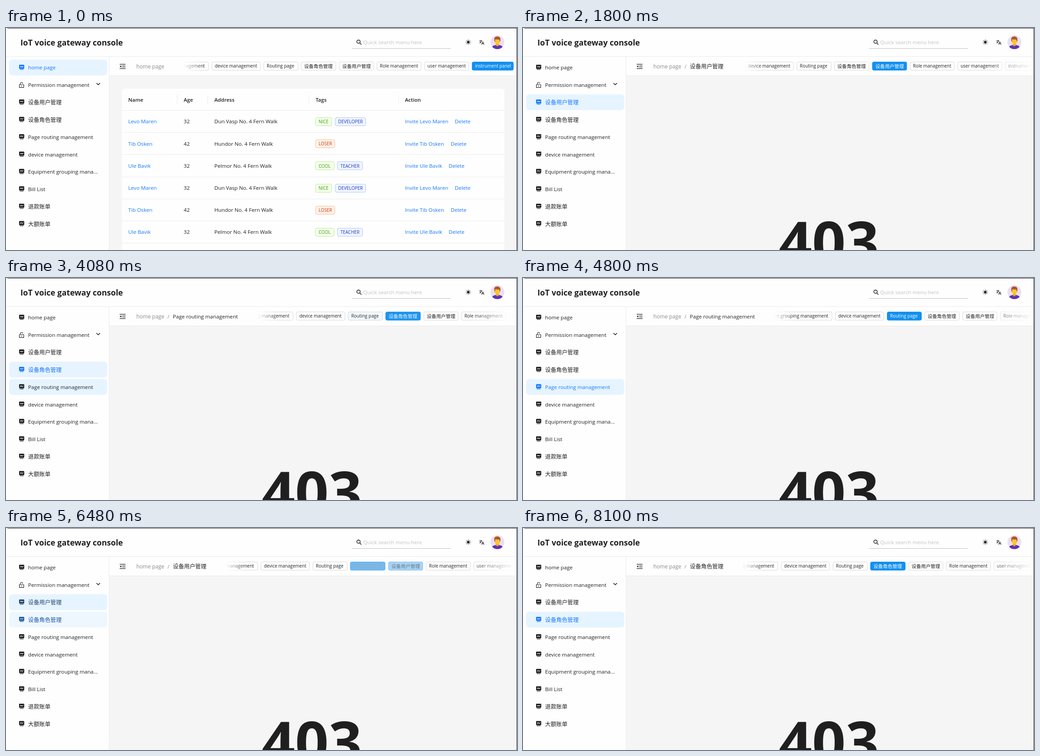
An HTML page that plays this animation: 1133x494 px, repeating every 8640 ms.

```html
<!DOCTYPE html>
<html lang="zh-CN">
<head>
<meta charset="utf-8">
<title>Console</title>
<style>
  html, body { margin: 0; width: 100%; height: 100%; overflow: hidden; background: #fefefe; }
  svg { display: block; }
  text { font-family: "Open Sans", "Noto Sans", sans-serif; white-space: pre; }
  text.zh { font-family: "Noto Sans CJK SC", "Noto Sans CJK", sans-serif; }
</style>
</head>
<body>
<svg id="stage" xmlns="http://www.w3.org/2000/svg" width="1133" height="494" viewBox="0 0 1133 494">
  <defs>
    <linearGradient id="fadeL"><stop offset="0" stop-color="#fefefe"/><stop offset="1" stop-color="#fefefe" stop-opacity="0"/></linearGradient>
    <linearGradient id="fadeR"><stop offset="0" stop-color="#fefefe" stop-opacity="0"/><stop offset="1" stop-color="#fefefe"/></linearGradient>
    <clipPath id="disc"><circle cx="1089.5" cy="31.5" r="15.5"/></clipPath>
  </defs>
  <rect width="1133" height="494" fill="#fefefe"/>
  <rect x="228" y="106" width="905" height="388" fill="#f5f5f5"/>
  <g id="table"></g>
  <g id="denied"></g>
  <g id="tabs"></g>
  <g id="coverL">
    <rect x="-270" y="72" width="300.5" height="26" fill="#fefefe"/>
    <rect x="30" y="72" width="45" height="26" fill="url(#fadeL)"/>
  </g>
  <rect id="coverR" x="1030" y="72" width="98" height="26" fill="url(#fadeR)"/>
  <rect x="1127" y="72" width="6" height="26" fill="#fefefe"/>
  <g id="crumbs"></g>
  <g id="menu"></g>
  <g id="head"></g>

  <!-- frame lines -->
  <path d="M0 63.5H1133M228.5 64V494M228 106.5H1133" stroke="#ebebeb" fill="none"/>
  <path d="M3 .5H1133M1132.5 0V494" stroke="#3a3a3a" fill="none"/>

  <!-- search, fold, sun and language icons -->
  <path d="M767 45.5H986" stroke="#bdbdbd"/>
  <g fill="none" stroke="#1f1f1f" stroke-width="1.5">
    <circle cx="781.6" cy="30.4" r="3.7"/><path d="M784.4 33.2L788 37"/>
    <path d="M252 80.6H265M257.5 84H265M257.5 87H265M252 90.4H265" stroke-width="1.2"/>
    <path d="M1025 25.8v1.6M1025 35.6v1.6M1019.3 31.5h1.6M1029.1 31.5h1.6M1021 27.5l1.1 1.1M1027.9 34.4l1.1 1.1M1021 35.5l1.1-1.1M1027.9 28.6l1.1-1.1" stroke-width="1.2"/>
    <path d="M1049.5 28.2h6.5M1052.7 26.8v1.4M1055 28.4q-1.2 3.6-5 5.2M1050.8 29.8q1.2 2.4 3.4 3.6M1054.6 37l2.7-6.2 2.7 6.2M1055.6 35h3.4" stroke-width="1.1"/>
  </g>
  <path d="M255.6 83v5l-3.4-2.5z" fill="#1f1f1f"/>
  <circle cx="1025" cy="31.5" r="2.9" fill="#1f1f1f"/>

  <!-- avatar -->
  <g clip-path="url(#disc)">
    <circle cx="1089.5" cy="31.5" r="15.5" fill="#e9e0f5"/>
    <path d="M1077.5 48v-4q0-4 5-5.2l4-1.3h6l4 1.3q5 1.2 5 5.2V48z" fill="#5e35b1"/>
    <path d="M1086.5 33h6v6q-3 3-6 0z" fill="#f5a81c"/>
    <ellipse cx="1089.5" cy="29.5" rx="6" ry="6.8" fill="#fdc62f"/>
    <path d="M1083 30q-1.500-7 1-9.500 3-2.500 7-1.500 5.500 1 5.300 6.500l-.3 4.500-1.300-.5q.2-2.500-1.700-4-4.600.500-8-.5-.8 2-.7 5z" fill="#b0562c"/>
  </g>
</svg>
<script>
const NS = 'http://www.w3.org/2000/svg';
const INK = '#1f1f1f', BLUE = '#1677ff';
const USER = '设备用户管理', ROLE = '设备角色管理';
const $ = id => document.getElementById(id);

function add(parent, tag, attrs) {
  const el = document.createElementNS(NS, tag);
  for (const k in attrs) el.setAttribute(k, attrs[k]);
  return parent.appendChild(el);
}

// Text placed by its left edge and the middle of the line
function label(parent, str, x, mid, fill = INK, size = 11.65, weight = 400) {
  const zh = /[\u4e00-\u9fff]/.test(str);
  const px = zh ? size * 1.063 : size;
  const el = add(parent, 'text', { x, y: mid + px * 0.37, fill, 'font-size': px, 'font-weight': weight });
  if (zh) el.setAttribute('class', 'zh');
  el.textContent = str;
  return el;
}

function box(parent, x, y, width, height, rx, fill, stroke) {
  return add(parent, 'rect', { x, y, width, height, rx, fill, stroke: stroke || 'none' });
}

// Header
label($('head'), 'IoT voice gateway console', 32, 32, INK, 17.6, 700);
label($('head'), 'Quick search menu here', 792, 32, '#c2c2c2', 11.5);

// Side menu
const menu = ['home page', 'Permission management', USER, ROLE, 'Page routing management',
  'device management', 'Equipment grouping mana...', 'Bill List', '退款账单', '大额账单'
].map((name, i) => {
  const mid = 88 + 38.65 * i, g = add($('menu'), 'g', { color: INK });
  const grey = box(g, 7, mid - 17.7, 217.5, 35.2, 7, '#f0f0f0');
  const bg = box(g, 7, mid - 17.7, 217.5, 35.2, 7, '#e6f4ff');
  grey.style.opacity = bg.style.opacity = 0;
  const icon = add(g, 'g', { transform: `translate(29 ${mid - 6.3})` });
  if (i === 1) {
    add(icon, 'path', { d: 'M.6 5.6H10.4V12H.6ZM2.8 5.6V3.4Q2.8.9 5.5.9T8.2 3.2M5.5 8v1.8',
      fill: 'none', stroke: INK, 'stroke-width': 1.1 });
    add(g, 'path', { d: `M200.7 ${mid - 4}l3.8 3.8l3.8-3.8`, fill: 'none', stroke: INK, 'stroke-width': 1.5 });
  } else {
    box(icon, 0, 0, 11.4, 9.2, 1.4, 'currentColor');
    add(icon, 'path', { d: 'M2 5.7L4.3 3.5L6.8 5.5L9.4 3.3', fill: 'none', stroke: '#fff', 'stroke-width': 1.1 });
    box(icon, 1.6, 10.1, 8.2, 1.2, 0, 'currentColor');
  }
  label(g, name, 49, mid + 0.1, 'currentColor');
  return { g, bg, grey };
});

// Tabs: name, left edge, width
const tabs = [['Equipment grouping management', 275, 174], ['device management', 456.5, 107.5],
  ['Routing page', 571.5, 76], [ROLE, 654.5, 77], [USER, 739, 76], ['Role management', 822.5, 98],
  ['user management', 928, 98], ['instrument panel', 1033.5, 91.5]
].map(([name, x, w]) => ({
  rect: box($('tabs'), x, 75.5, w, 18.5, 3, '#fff', '#d9d9d9'),
  text: label($('tabs'), name, x + 6.5, 84.8, INK, 9.95)
}));

// Breadcrumb
label($('crumbs'), 'home page', 289, 85.7, '#8c8c8c', 11.8);
const slash = label($('crumbs'), '/', 358, 85.7, '#8c8c8c');
const crumb = label($('crumbs'), USER, 370, 85.5);
const crumbZh = label($('crumbs'), ROLE, 370, 85.5);
const crumbEn = label($('crumbs'), 'Page routing management', 370, 85.7);

// Table
const table = $('table');
const tagStyle = {
  green: ['#389e0d', '#f6ffed', '#b7eb8f'],
  navy: ['#1d39c4', '#f0f5ff', '#adc6ff'],
  red: ['#d4380d', '#fff2e8', '#ffbb96']
};
const people = [
  ['Levo Maren', 32, 'Dun Vasp No. 4 Fern Walk', 995, [['NICE', 686.5, 35.5, 'green'], ['DEVELOPER', 730, 67.5, 'navy']]],
  ['Tib Osken', 42, 'Hundor No. 4 Fern Walk', 986, [['LOSER', 686.5, 42.5, 'red']]],
  ['Ule Bavik', 32, 'Pelmor No. 4 Fern Walk', 981.5, [['COOL', 686.5, 41, 'green'], ['TEACHER', 735, 55.5, 'navy']]]
];
add(table, 'path', { d: 'M257 494V142q0-7 7-7H1098q7 0 7 7V494z', fill: '#fefefe' });
[['Name', 271], ['Age', 394], ['Address', 462], ['Tags', 686.5], ['Action', 884.5]]
  .forEach(([s, x]) => label(table, s, x, 159.3, INK, 11.5, 600));
add(table, 'path', { d: 'M379.5 149v20M447.5 149v20M671.5 149v20M870.5 149v20', stroke: '#ececec' });
for (let i = 0; i < 7; i++) {
  const line = Math.round(183 + 49.2 * i) + 0.5, mid = 208 + 49.2 * i;
  add(table, 'path', { d: `M257 ${line}H1105`, stroke: '#ececec' });
  if (i === 6) break;
  const [name, age, address, delX, tags] = people[i % 3];
  label(table, name, 271, mid, BLUE);
  label(table, String(age), 394, mid);
  label(table, address, 462, mid);
  label(table, 'Invite ' + name, 884.5, mid, BLUE);
  label(table, 'Delete', delX, mid, BLUE);
  for (const [s, x, w, kind] of tags) {
    const [ink, fill, edge] = tagStyle[kind];
    box(table, x, Math.round(mid - 9) + 0.5, w, 18, 3, fill, edge);
    label(table, s, x + 6.5, mid + 0.6, ink, 9.95);
  }
}

// Error page
add($('denied'), 'text', { x: 678, y: 523.5, fill: INK, 'font-size': 130, 'font-weight': 700, 'text-anchor': 'middle' })
  .textContent = '403';

// Pages: menu item, tab, left edge of the tab strip, tab shift at rest
const pages = {
  home: { item: 0, tab: 7, left: 363, shift: 0 },
  user: { item: 2, tab: 4, left: 456, shift: 34.5, crumb },
  role: { item: 3, tab: 3, left: 456, shift: 116, crumb: crumbZh },
  route: { item: 4, tab: 2, left: 527, shift: 236, crumb: crumbEn }
};
// Visits: page, time of press, time of switch
const visits = [['home', -2000, -2000], ['user', 1250, 1290], ['role', 2520, 2565], ['route', 3960, 4050],
  ['role', 5190, 5220], ['user', 6240, 6380], ['role', 7320, 7390]];
const LOOP = 8640, SLIDE = 560, TINT = 240;

const ramp = (t, from, len) => Math.min(1, Math.max(0, (t - from) / len));
const ease = k => k * k * (3 - 2 * k);
const rgb = hex => [1, 3, 5].map(i => parseInt(hex.slice(i, i + 2), 16));
function mix(a, b, k) {
  const to = rgb(b);
  return `rgb(${rgb(a).map((v, i) => Math.round(v + (to[i] - v) * k))})`;
}

function draw(t) {
  let n = visits.length - 1;
  while (n && t < visits[n][1]) n--;
  const [name, press, go] = visits[n];
  const next = pages[name], prev = pages[visits[Math.max(0, n - 1)][0]];
  const switched = t >= go, page = switched ? next : prev;
  const tint = ease(ramp(t, go, TINT)), pressed = ramp(t, press, 100);
  const weight = (i, a, b, inK) => i === b ? inK : i === a ? 1 - tint : 0;

  menu.forEach((m, i) => {
    m.bg.style.opacity = weight(i, prev.item, next.item, pressed);
    m.g.setAttribute('color', mix(INK, BLUE, weight(i, prev.item, next.item, tint)));
  });
  menu[3].grey.style.opacity = ramp(t, 6930, 120) * (1 - ramp(t, 7320, 100));

  tabs.forEach((tab, i) => {
    const k = weight(i, prev.tab, next.tab, tint);
    tab.rect.setAttribute('fill', mix('#fefefe', '#1390f0', k));
    tab.rect.setAttribute('stroke', mix('#d9d9d9', '#1390f0', k));
    tab.text.setAttribute('fill', mix(INK, '#ffffff', k));
  });

  // The strip jumps with the breadcrumb width, then scrolls to rest
  let shift = prev.shift;
  if (switched) {
    const from = prev.shift + next.left - prev.left;
    shift = from + (next.shift - from) * ease(ramp(t, go, SLIDE));
  }
  $('tabs').setAttribute('transform', `translate(${shift.toFixed(2)} 0)`);
  $('coverL').setAttribute('transform', `translate(${page.left} 0)`);
  $('coverR').style.opacity = ramp(t, 1290, 300);

  const home = page === pages.home;
  table.style.display = home ? '' : 'none';
  $('denied').style.display = slash.style.display = home ? 'none' : '';
  for (const c of [crumb, crumbZh, crumbEn]) c.style.display = page.crumb === c ? '' : 'none';
}

const start = performance.now();
function tick() {
  draw((performance.now() - start) % LOOP);
  requestAnimationFrame(tick);
}
tick();
</script>
</body>
</html>
```
